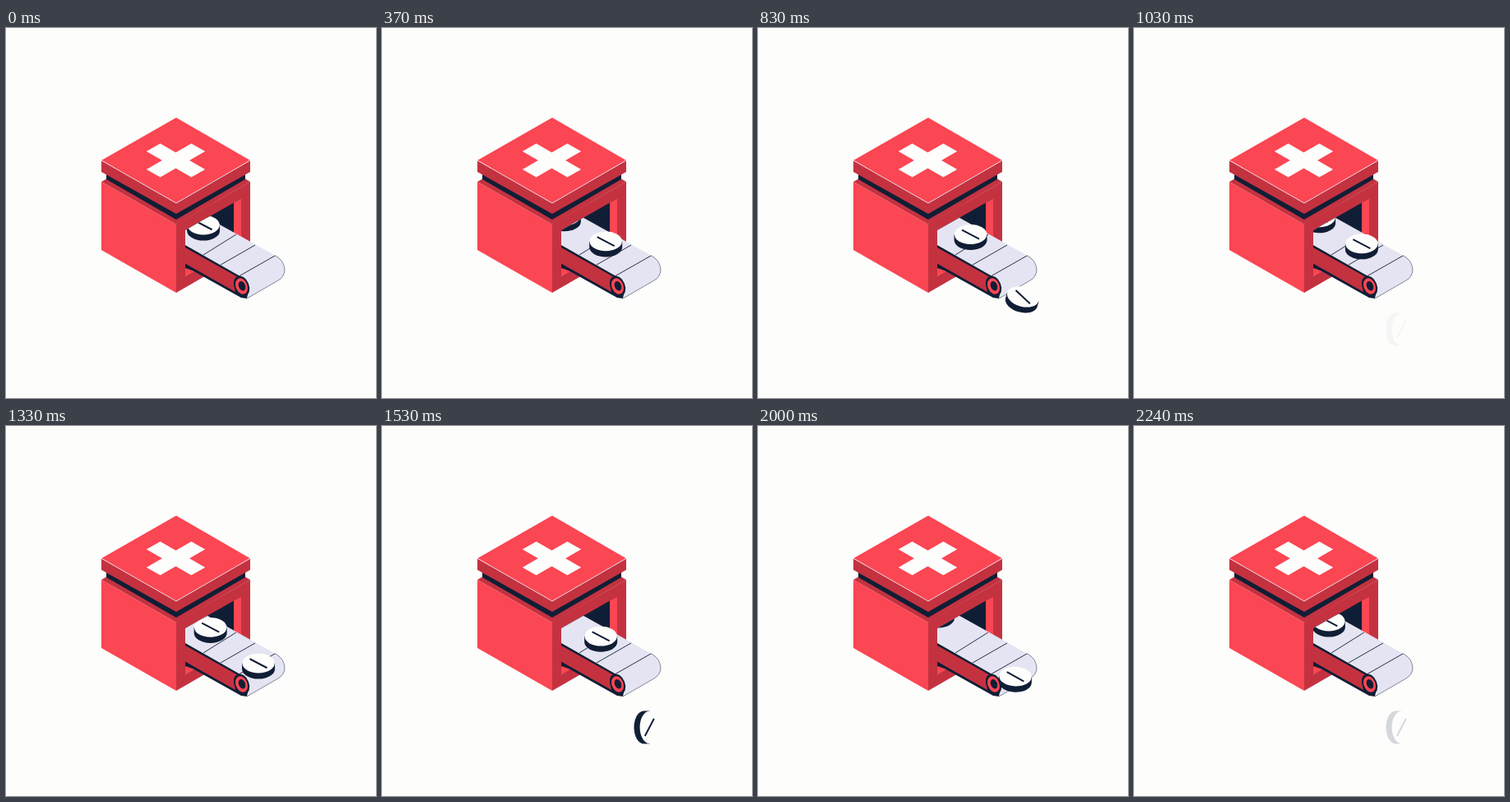
These frames come from a looping animation (450x450 px, 2.28 s). An HTML page:

```html
<!DOCTYPE html>
<html lang="en">
<head>
<meta charset="utf-8">
<title>Pill conveyor</title>
<style>
  html, body { margin: 0; width: 100%; height: 100%; overflow: hidden; background: #fdfdfc; }
  svg { display: block; width: 100vw; height: 100vh; }
  .red { fill: #fb4653; }
  .deep { fill: #c43240; }
  .dark { fill: #101e35; }
  .belt { fill: #e5e4f2; }
  .white { fill: #fdfdfc; }
  .seam { fill: none; stroke: #101e35; stroke-width: .9; }
  .edge { fill: none; stroke: #f3dbe2; stroke-width: 1; }
</style>
</head>
<body>
<svg viewBox="0 0 450 450" xmlns="http://www.w3.org/2000/svg">
  <defs>
    <clipPath id="door"><path d="M218 246 286 207.500 450 115V450H218Z"/></clipPath>
    <g id="pill">
      <path class="dark" d="M-20 -3.5V3.5A20 12 0 0 0 20 3.5V-3.5Z"/>
      <ellipse class="white" cy="-3.5" rx="19.7" ry="11.9"/>
      <path d="M-10.5 -8.8 10.5 2.2" stroke="#101e35" stroke-width="2"/>
    </g>
  </defs>

  <!-- body -->
  <path class="deep" d="M116 187 207 135 297 187 207 239Z"/>
  <path class="red" d="M116 187 207 239V322L116 270Z"/>
  <path class="deep" d="M207 238.500 297 187V270L207 322Z"/>
  <path class="dark" d="M122 170H291V184L207 233 122 184Z"/>

  <!-- lid -->
  <path class="deep" d="M116 161 207 213 297 161V175L207 226 116 175Z"/>
  <path class="red" d="M207 109 297 161 207 213 116 161Z"/>
  <path class="edge" d="M116 161 207 213 297 161"/>
  <path class="white" transform="matrix(.866 .5 -.866 .5 206.5 161)"
    d="M-31.500 -9.700H31.500V9.700H-31.500ZM-9.700 -31.500H9.700V31.500H-9.700Z"/>

  <!-- opening -->
  <path class="dark" d="M218 246 286 207.500V264L218 303Z"/>
  <path class="red" d="M277 212.500 286 207.500V262L277 258Z"/>
  <path class="red" d="M218 292 230 296 218 303Z"/>

  <!-- belt -->
  <path class="dark" d="M218 264 288 302 296 314 293 329 286 328 218 290Z"/>
  <path class="deep" d="M218 267 282 303Q276 309 279 321L218 286.500Z"/>
  <path class="belt" d="M218 246 245 230.700 327 276.500Q339 283 339 295 338 303 331 307L293 329Q299 319 293 308 290 304 284 301.500L218 264Z"/>
  <path class="seam" d="M240 276 280 251M261 288 303 264M284 301.500 327 277"/>
  <path class="seam" stroke-opacity=".55" d="M327 276.500Q339 283 339 295 338 303 331 307L293 329"/>
  <g transform="translate(286.5 314) rotate(-22)">
    <ellipse class="dark" rx="9" ry="13"/>
    <ellipse class="red" rx="7" ry="10"/>
    <ellipse class="dark" cx=".5" rx="4" ry="6"/>
  </g>

  <g id="pills" clip-path="url(#door)"></g>
</svg>
<script>
  const LOOP = 2280;
  const STARTS = [0, 610, 1225, LOOP];
  const TIP = 634, LAND = 920, GONE = 1035;
  const GRAVITY = 0.00099, REST_X = 322, REST_Y = 363;

  const ramp = (t, from, to) => Math.min(1, Math.max(0, (t - from) / (to - from)));

  // Pose of a pill t ms after it passes the doorway.
  function pose(t) {
    const roll = 240 + 0.08 * t + 1.8e-5 * t * t;
    const drop = GRAVITY * Math.max(0, t - TIP) ** 2;
    const swing = 7 * Math.sin(Math.PI * ramp(t, 820, LAND));
    return {
      x: Math.min(roll, REST_X) + swing,
      y: Math.min(239.5 + 0.62 * (roll - 240) + drop, REST_Y),
      turn: 90 * ramp(t, 720, LAND) ** 3,
      alpha: 1 - ramp(t, LAND, GONE)
    };
  }

  const layer = document.getElementById('pills');
  const pills = STARTS.map(start => {
    const el = document.createElementNS('http://www.w3.org/2000/svg', 'use');
    el.setAttribute('href', '#pill');
    layer.prepend(el);
    return { el, start };
  });

  function draw(now) {
    const t = now % LOOP;
    for (const { el, start } of pills) {
      const p = pose(t - start);
      el.setAttribute('opacity', p.alpha);
      el.setAttribute('transform', `translate(${p.x} ${p.y + 3.5}) rotate(${p.turn})`);
    }
  }

  const begin = performance.now();
  function tick() {
    draw(performance.now() - begin);
    requestAnimationFrame(tick);
  }
  tick();
</script>
</body>
</html>
```
